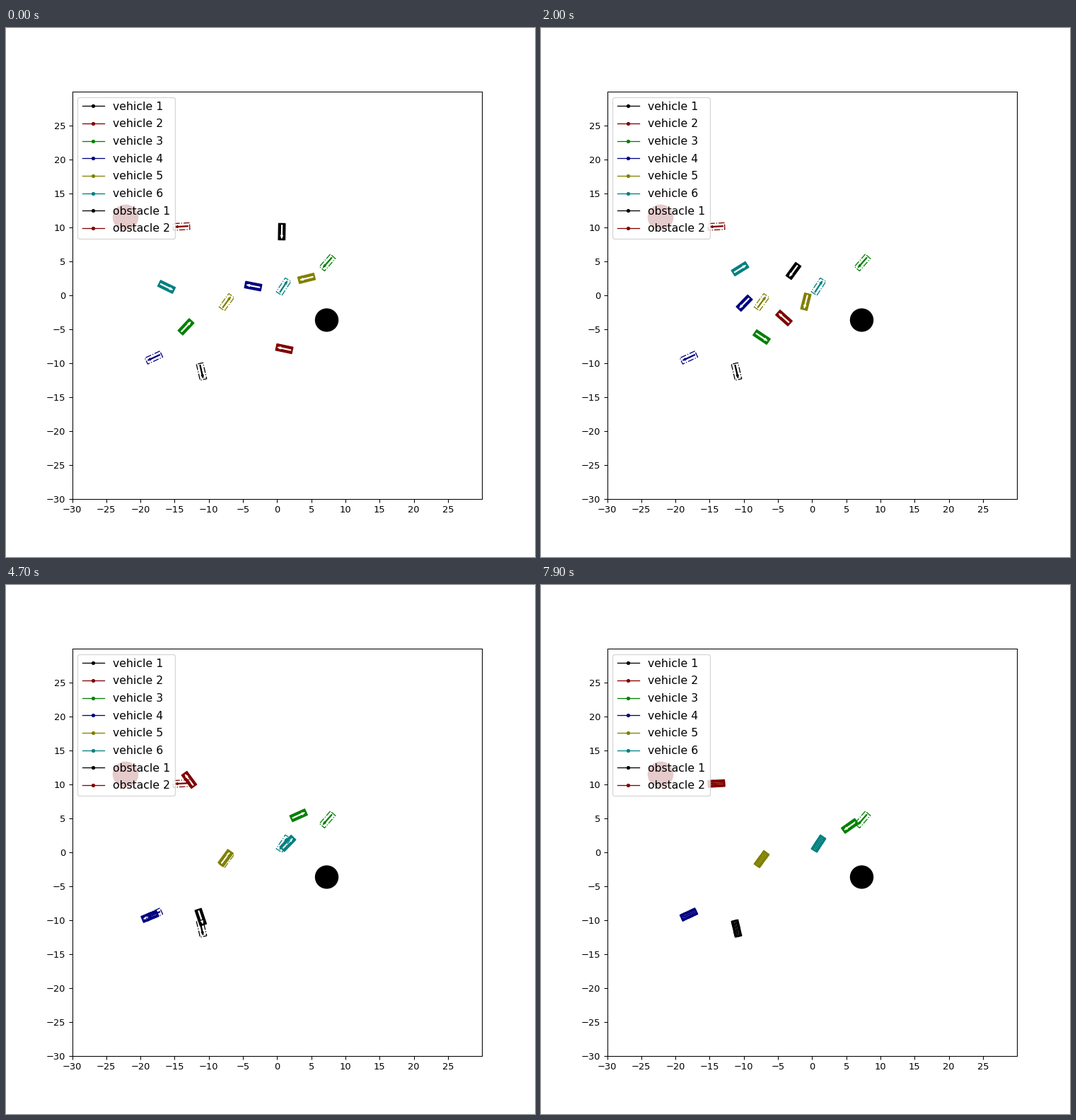
These frames come from a looping animation (748 by 748 pixels, 8 s). A matplotlib script:

```python
import numpy as np
import matplotlib.pyplot as plt
from matplotlib.animation import FuncAnimation
from matplotlib.lines import Line2D
from matplotlib.patches import Circle, FancyArrow, Rectangle
from matplotlib.transforms import Affine2D

SIZE, DPI = 748, 93.5
FRAMES, INTERVAL = 80, 100
LEFT, RIGHT, BOTTOM, TOP = 0.125, 0.9, 0.11, 0.88
CAR = (2.42, 0.98)

# Steps at which every car passes its next waypoint; its goal comes last
STEPS = np.array([0, 19, 27, 37, 55, 70, 90])

# Waypoints and goals: x and y on the stage in pixels, heading in degrees
ROUTES = {
    "black": [(390, 288, -91), (357, 343.5, -126), (325.5, 384.5, -166),
              (264, 426, -71), (279.5, 493.5, -73), (276.5, 485.7, -77)],
    "maroon": [(393.5, 453.5, 168), (343.5, 410, 138), (289.5, 376.5, 128),
               (270.5, 298.5, 88), (243.5, 278.5, 176), (248, 280.7, 183)],
    "green": [(254.5, 422.5, 47), (312, 437, -34), (370.5, 458, 14),
              (351, 394.5, 111), (486, 315, -95), (434, 342, -152),
              (454.5, 331.7, -131)],
    "navy": [(349.5, 365, 169), (287.5, 389, 226), (247, 434.5, 227),
             (210.5, 465, 206), (209, 466, 205)],
    "olive": [(425, 354, 194), (374.5, 387, 256), (347, 422, 204),
              (309, 398, 90), (312, 387.7, 54)],
    "teal": [(227, 366, -26), (281.5, 340.5, 32), (340, 339.5, -37),
             (388, 369.5, 16), (392.5, 365.7, 57)],
}
OBSTACLES = [(453.5, 413, 1.66, "black"), (169, 267.7, 1.82, "maroon")]


def to_data(px, py):
    x = (np.asarray(px) / SIZE - LEFT) / (RIGHT - LEFT) * 60 - 30
    y = (1 - np.asarray(py) / SIZE - BOTTOM) / (TOP - BOTTOM) * 60 - 30
    return x, y


def knot_slopes(rate, gap, start=0):
    inner = (rate[:-1] * gap[1:] + rate[1:] * gap[:-1]) / (gap[:-1] + gap[1:])
    return np.concatenate([[start], inner, [0]])


def hermite(t, steps, values, slopes):
    t = np.minimum(t, steps[-1])
    i = np.clip(np.searchsorted(steps, t, side="right") - 1, 0, len(steps) - 2)
    h = steps[i + 1] - steps[i]
    u = (t - steps[i]) / h
    return (values[i] * (1 + 2 * u) * (1 - u) ** 2
            + values[i + 1] * u * u * (3 - 2 * u)
            + h * slopes[i] * u * (1 - u) ** 2
            - h * slopes[i + 1] * u * u * (1 - u))


def drive(route):
    """Pose at every step: from rest, along the heading or backwards."""
    px, py, deg = np.array(route).T
    x, y = to_data(px, py)
    steps = STEPS[:len(route)]
    gap = np.diff(steps)
    mid = np.radians((deg[:-1] + deg[1:]) / 2)
    dx, dy = np.diff(x), np.diff(y)
    way = np.sign(dx * np.cos(mid) + dy * np.sin(mid))
    speed = knot_slopes(way * np.hypot(dx, dy) / gap, gap)
    turn = np.diff(deg) / gap
    spin = knot_slopes(turn, gap, turn[0])
    spin[1:-1][turn[:-1] * turn[1:] <= 0] = 0
    rad = np.radians(deg)
    t = np.arange(FRAMES - 1)
    return np.column_stack([hermite(t, steps, x, speed * np.cos(rad)),
                            hermite(t, steps, y, speed * np.sin(rad)),
                            hermite(t, steps, deg, spin)])


def make_parts(arrow_color, zorder, **style):
    length, width = CAR
    box = Rectangle((-length / 2, -width / 2), length, width, lw=1,
                    zorder=zorder, **style)
    arrow = FancyArrow(-0.97, 0, 1.5, 0, width=0.1, lw=1, color=arrow_color,
                       zorder=zorder + 0.1)
    for part in (box, arrow):
        ax.add_patch(part)
    return box, arrow


def place(parts, x, y, deg):
    pose = Affine2D().rotate_deg(deg).translate(x, y) + ax.transData
    for part in parts:
        part.set_transform(pose)


fig = plt.figure(figsize=(SIZE / DPI, SIZE / DPI), dpi=DPI)
ax = fig.add_axes([LEFT, BOTTOM, RIGHT - LEFT, TOP - BOTTOM],
                  xlim=(-30, 30), ylim=(-30, 30))
ax.set_xticks(np.arange(-30, 30, 5))
ax.set_yticks(np.arange(-30, 30, 5))

for px, py, radius, color in OBSTACLES:
    ax.add_patch(Circle(to_data(px, py), radius, color=color))

cars, paths = [], []
for color, route in ROUTES.items():
    cars.append(make_parts("white", 2, color=color))
    paths.append(drive(route))
    px, py, deg = route[-1]
    goal = make_parts(color, 3, ec=color, fill=False, ls="-.")
    place(goal, *to_data(px, py), deg)

labels = [f"vehicle {i}" for i in range(1, 7)] + ["obstacle 1", "obstacle 2"]
handles = [Line2D([], [], color=c, marker=".", lw=1)
           for c in [*ROUTES, "black", "maroon"]]
ax.legend(handles, labels, loc="upper left", fontsize=12, labelspacing=0.62)


def update(frame):
    step = max(frame - 1, 0)
    for car, path in zip(cars, paths):
        place(car, *path[step])
    return [part for car in cars for part in car]


anim = FuncAnimation(fig, update, frames=FRAMES, interval=INTERVAL,
                     repeat=True, repeat_delay=0)
plt.show()
```
